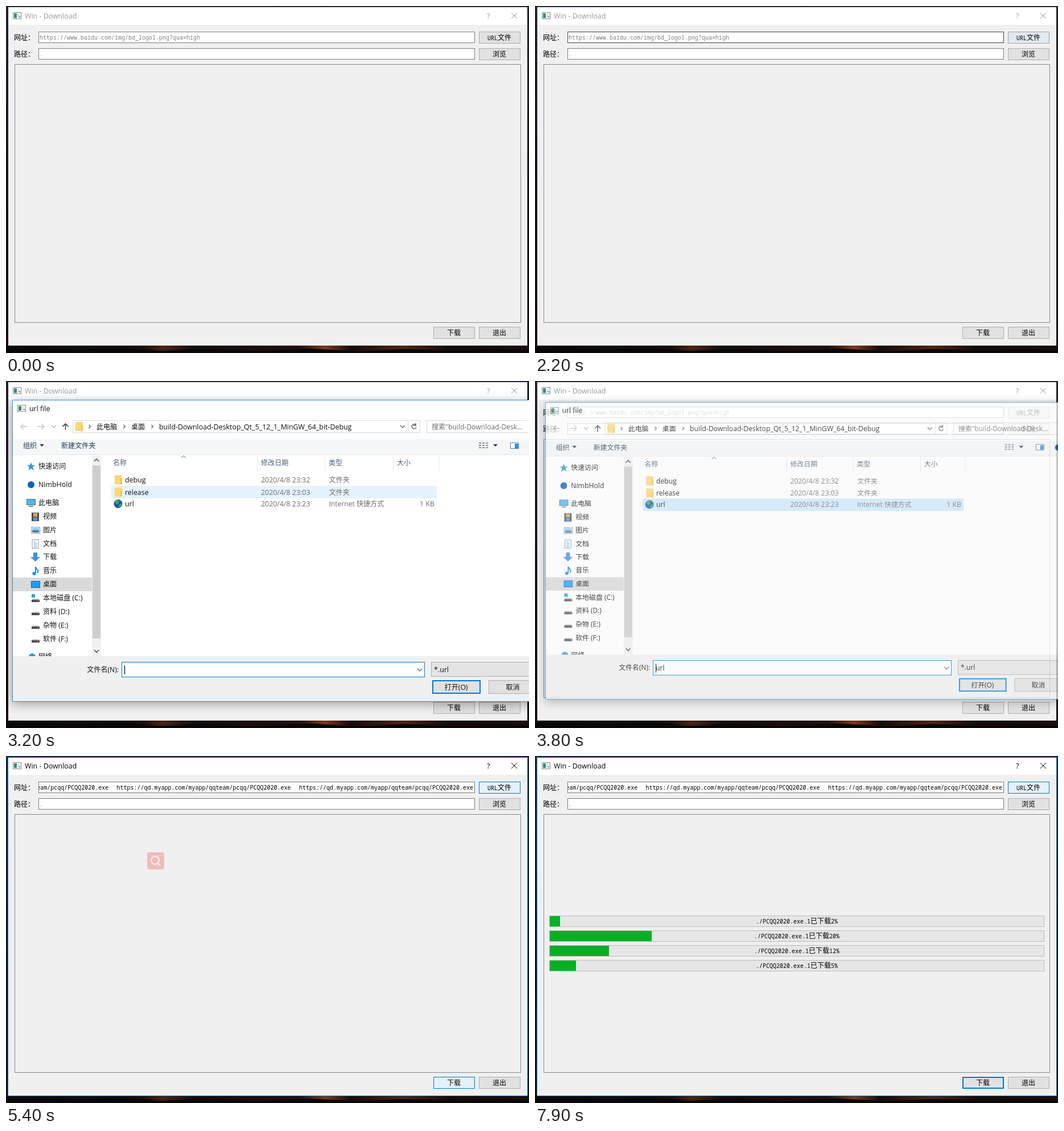
Animation, 919 px wide and 609 px high, one loop 8 s. Source, as an HTML page:

```html
<!DOCTYPE html>
<html lang="zh-CN">
<head>
<meta charset="utf-8">
<title>Win - Download</title>
<style>
html, body { margin: 0; width: 100%; height: 100%; overflow: hidden; background: #0c090d; }
svg { display: block; }
text { white-space: pre; }
.ui { font: 12.4px 'Open Sans', 'Noto Sans CJK SC', sans-serif; }
.cj { font-size: 12.1px; }
.song { font: 12px 'Noto Sans Mono', 'Noto Sans CJK SC', monospace; }
.mid { text-anchor: middle; }
.end { text-anchor: end; }
.base { filter: drop-shadow(0 4px 9px rgba(0, 0, 0, .35)); }
</style>
</head>
<body>
<svg id="stage" width="919" height="609" viewBox="0 0 919 609">
  <defs>
    <linearGradient id="dusk">
      <stop offset="0" stop-color="#0b080b"/><stop offset=".26" stop-color="#1a0d0b"/>
      <stop offset=".3" stop-color="#4a2416"/><stop offset=".36" stop-color="#140b0a"/>
      <stop offset=".56" stop-color="#20100c"/><stop offset=".61" stop-color="#7a3a1c"/>
      <stop offset=".66" stop-color="#150b0a"/><stop offset=".76" stop-color="#4d2513"/>
      <stop offset=".85" stop-color="#120a09"/><stop offset="1" stop-color="#1c0f0c"/>
    </linearGradient>
    <linearGradient id="sky" x2="0" y2="1">
      <stop offset="0" stop-color="#23222f"/><stop offset=".6" stop-color="#151219"/>
      <stop offset="1" stop-color="#1d100e"/>
    </linearGradient>
    <clipPath id="field"><path d="M58 46h765v18H58z"/></clipPath>
    <clipPath id="side"><path d="M12 131h139v352H12z"/></clipPath>
  </defs>
</svg>
<script>
const LOOP = 8000;
const BLUE = '#0078d7';
const stage = document.getElementById('stage');

// markup helpers
const rect = (x, y, w, h, fill, extra = '') =>
  `<rect x="${x}" y="${y}" width="${w}" height="${h}" fill="${fill}" ${extra}/>`;
const box = (x, y, w, h, fill, line, extra = '') =>
  rect(x + .5, y + .5, w - 1, h - 1, fill, `stroke="${line}" ${extra}`);
const line = (d, color, width = 1) =>
  `<path d="${d}" fill="none" stroke="${color}" stroke-width="${width}"/>`;
const shape = (d, fill) => `<path d="${d}" fill="${fill}"/>`;
const dot = (x, y, r, fill) => `<circle cx="${x}" cy="${y}" r="${r}" fill="${fill}"/>`;
const ui = (x, y, s, fill = '#111', cls = '') =>
  `<text class="ui ${/[^ -~]/.test(s) ? 'cj' : ''} ${cls}" x="${x}" y="${y}" fill="${fill}">${s}</text>`;
// half-width letters take 6px, full-width ones 12px
const half = s => s.replace(/[!-~]+/g, m => `<tspan font-size="10">${m}</tspan>`);
const song = (x, y, s, fill = '#000', cls = '', extra = '') =>
  `<text class="song ${cls}" x="${x}" y="${y}" fill="${fill}" ${extra}>${half(s)}</text>`;
const button = (id, x, y, label) =>
  box(x, y, 73, 21, '#e1e1e1', '#adadad', `id="${id}"`) + song(x + 36, y + 15, label, '#000', 'mid');
const down = (x, y, c = '#555', w = 1.2) => line(`M${x - 4} ${y - 2}l4 4 4-4`, c, w);
const next = x => line(`M${x - 1.5} 77l3 3-3 3`, '#555', 1.2);
const caret = (x, y) => shape(`M${x - 4} ${y - 2}h8l-4 4z`, '#1e395b');

const appIcon = (x, y) => box(x, y, 15, 12, '#fff', '#7d8790') + rect(x + 2, y + 2, 5, 8, '#2f8f6f') +
  rect(x + 9, y + 3, 1, 6, '#8fb0d0') + rect(x + 11, y + 7, 2, 2, '#4a78b0');
const folder = (x, y) => rect(x, y - 8, 13, 16, '#f8d775') + rect(x + 10, y - 3, 3, 11, '#efc55a');
const globe = (x, y) => dot(x, y, 7.5, '#1556a8') +
  shape(`M${x - 5} ${y - 5}q6-3 7 1-1 4-4 5-4-1-3-6zM${x + 2} ${y + 1}q5-2 4 2-2 3-5 3z`, '#3fae49');
const drive = (x, y) => shape(`M${x - 5} ${y}h10l2 2h-14z`, '#bfc3c6') + rect(x - 7, y + 2, 14, 4, '#4a4d50') +
  rect(x + 3, y + 3, 2, 1, '#6fe06f');
const page = (x, y) => box(x - 6, y - 8, 12, 16, '#fff', '#8b97a3') +
  line(`M${x - 3} ${y - 4}h4M${x - 3} ${y - 1}h6M${x - 3} ${y + 2}h6M${x - 3} ${y + 5}h6`, '#4a9fd8');

const places = [
  [150, '快速访问', 0, y => shape(`M44 ${y - 7}l2 5 5 0-4 3 2 6-5-3.500-5 3.500 2-6-4-3 5 0z`, '#2f93e0')],
  [182, 'NimbHold', 0, y => dot(44, y, 6, '#0a62c4')],
  [214, '此电脑', 0, y => box(36, y - 7, 16, 11, '#4fb4ee', '#4d7389') + rect(40, y + 5, 8, 2, '#7a8c98')],
  [238, '视频', 1, y => rect(45, y - 7, 13, 15, '#4b4f55') + rect(48, y - 6, 7, 6, '#d9a94c') + rect(48, y + 1, 7, 6, '#5d8fc9')],
  [262, '图片', 1, y => box(44, y - 6, 16, 12, '#fff', '#8b97a3') + rect(46, y - 4, 12, 4, '#8cc8f0') + rect(46, y, 12, 4, '#4d7f9b')],
  [286, '文档', 1, y => page(51.5, y)],
  [309, '下载', 1, y => shape(`M48 ${y - 8}h7v8h5l-8.500 8-8.500-8h5z`, '#3b93dc')],
  [333, '音乐', 1, y => line(`M52 ${y + 4}v-11q1 4 4 6 1 2-1 5`, '#1e8fe8', 2) + dot(49.500, y + 5, 3, '#1e8fe8')],
  [357, '桌面', 1, y => box(44, y - 6, 16, 12, '#18a0f5', '#0b62b8')],
  [381, '本地磁盘 (C:)', 1, y => drive(52, y + 1) + rect(45, y - 7, 6, 6, '#19a5e8')],
  [405, '资料 (D:)', 1, y => drive(52, y)],
  [429, '杂物 (E:)', 1, y => drive(52, y)],
  [453, '软件 (F:)', 1, y => drive(52, y)],
  [484, '网络', 0, y => dot(46, y, 6, '#3a9bd9') + rect(39, y - 1, 8, 6, '#7a8c98')]
];
const files = [
  [173.5, 'debug', '2020/4/8 23:32', '文件夹', '', folder],
  [195, 'release', '2020/4/8 23:03', '文件夹', '', folder],
  [215.5, 'url', '2020/4/8 23:23', 'Internet 快捷方式', '1 KB', (x, y) => globe(x + 6, y)]
];
const grey = '#6d6d6d', head = '#4c607a';

const desktop = rect(0, 0, 919, 609, 'url(#sky)') + rect(0, 596, 919, 13, 'url(#dusk)') +
  shape('M0 609v-7l60-3 60 3 80-3 70 6 80-3 90 4 90-5 90 5 80-4 90 3 80-3 49 3v4z', '#0a0708');

const exe = 'https://qd.myapp.com/myapp/qqteam/pcqq/PCQQ2020.exe';
const tops = [280, 306, 332, 358];

const main = rect(4, 2, 912, 594, '#f0f0f0') + rect(4, 2, 912, 31, '#fff') + appIcon(12, 11) +
  `<g id="title">${ui(33, 21.500, 'Win - Download', 'currentColor')}${ui(845, 21.500, '?', 'currentColor')}
   ${line('M888 12l10 10M898 12l-10 10', 'currentColor')}</g>` +
  song(14, 60, '网址：') + song(14, 89, '路径：') +
  box(57, 45, 767, 20, '#fff', '#7a7a7a', 'id="edit"') + box(57, 74, 767, 20, '#fff', '#7a7a7a') +
  song(59, 59, 'https://www.baidu.com/img/bd_logo1.png?qua=high', '#808080', '', 'id="hint"') +
  `<g id="links" clip-path="url(#field)">${song(821, 59, Array(4).fill(exe).join('  '), '#000', 'end')}</g>` +
  song(59, 88, '.', '#808080') +
  box(15, 102, 890, 454, 'none', '#828790') +
  button('pick', 831, 45, 'URL文件') + button('browse', 831, 74, '浏览') +
  button('load', 751, 563, '下载') + button('quit', 831, 563, '退出') +
  rect(752.5, 564.5, 70, 18, 'none', `id="focus" stroke="${BLUE}"`) +
  '<g id="bars">' + tops.map((y, i) => box(25, y, 870, 20, '#e6e6e6', '#bcbcbc') +
    rect(26, y + 1, 0, 18, '#06b025', `id="bar${i}"`) + song(460, y + 14, '', '#000', 'mid', `id="tag${i}"`)).join('') + '</g>' +
  rect(3.5, 2.5, 913, 594, 'none', `id="frame" stroke="${BLUE}"`);

const dialog = '<g id="dialog">' +
  rect(11.5, 33.5, 934, 529, '#fff', 'class="base" stroke="#3a8fd6"') +
  rect(12, 102, 933, 28, '#f5f6f7') + line('M12 129.500h933', '#e8e8e8') + rect(12, 483, 933, 79, '#f0f0f0') +
  appIcon(20, 42) + ui(41, 52.500, 'url file') +
  line('M66 80h-11m7-5l5 5-5 5', '#c4c4c4', 1.4) + down(84, 80, '#aaa') + line('M104.500 86v-11m-5 5l5-5 5 5', '#555', 1.8) +
  '<g id="late">' + line('M37 80h-11m5-5l-5 5 5 5', '#c4c4c4', 1.4) +
  box(117, 69, 611, 22, '#fff', '#d9d9d9') + folder(122, 80) + next(147) + ui(159, 84.500, '此电脑') + next(208) +
  ui(220, 84.500, '桌面') + next(257) + ui(269, 84.500, 'build-Download-Desktop_Qt_5_12_1_MinGW_64_bit-Debug') +
  down(697, 80) + line('M706.500 70v20', '#d9d9d9') + line('M720 77a4 4 0 1 0 1 4M720 74v4h-4', '#555', 1.3) +
  box(739, 69, 198, 22, '#fff', '#d9d9d9') + ui(748, 84.500, '搜索"build-Download-Desk...', grey) +
  ui(30, 118, '组织', '#1e395b') + caret(63, 113) + ui(97, 118, '新建文件夹', '#1e395b') +
  line('M831 109h4m2 0h4m2 0h4M831 113h4m2 0h4m2 0h4M831 117h4m2 0h4m2 0h4', '#8a8f96', 2) + caret(860, 113) + '</g>' +
  box(886, 108, 15, 11, '#fff', '#5c7fa3') + rect(894, 110, 6, 8, '#2b8fe0') + dot(925, 114, 5, '#0a68b8') +
  '<g id="sizeHover">' + rect(680, 130, 80, 28, '#d9ebf9') + line('M744.500 130v28', '#b5d5ee') + down(752, 144) + '</g>' +
  line('M441.500 130v28M560.500 130v28M680.500 130v28M760.500 130v28', '#e5e5e5') +
  line('M308 135l4-4 4 4', '#666') +
  [[188, '名称'], [448, '修改日期'], [567, '类型'], [687, '大小']].map(([x, s]) => ui(x, 148, s, head)).join('') +
  rect(185, 184, 572, 22, '#e5f3ff', 'id="row"') +
  files.map(([y, name, date, kind, size, icon]) => icon(191, y) + ui(209, y + 4.500, name) +
    ui(448, y + 4.500, date, grey) + ui(567.500, y + 4.500, kind, grey) + ui(753, y + 4.500, size, grey, 'end')).join('') +
  rect(12, 345, 139, 24, '#d9d9d9') + '<g clip-path="url(#side)">' +
  places.map(([y, s, sub, icon]) => icon(y) + ui(sub ? 65 : 57, y + 4, s)).join('') + '</g>' +
  rect(151, 131, 16, 352, '#f0f0f0') + rect(152, 148, 14, 304, '#cdcdcd') +
  line('M155 141l4-4 4 4', '#555', 1.6) + down(159, 474, '#555', 1.6) +
  ui(198, 510.500, '文件名(N):', '#111', 'end') + box(203, 493, 533, 27, '#fff', BLUE) +
  line('M208.500 499v16', '#000', 1.2) + `<g id="name">${ui(208, 511, 'url')}</g>` + down(727, 507) +
  box(747, 493, 190, 26, '#e4e4e4', '#adadad') + ui(752, 510.500, '*.url') +
  rect(750, 526, 83, 22, '#e1e1e1', `stroke="${BLUE}" stroke-width="2"`) + ui(791, 541.500, '打开(O)', '#111', 'mid') +
  box(848, 525, 85, 24, '#e1e1e1', '#adadad') + ui(890.500, 541.500, '取消', '#111', 'mid') + '</g>';

const lookup = '<g id="lookup">' + rect(248, 169, 30, 30, '#f04747', 'rx="4"') +
  '<circle cx="262" cy="183" r="7" fill="none" stroke="#fff" stroke-width="1.8"/>' +
  line('M266.500 188l4.500 4.500', '#fff', 2) + '</g>';

stage.insertAdjacentHTML('beforeend', desktop + main + dialog + lookup);

// timelines: [start, ...values], held until the next entry
const editLine = [[0, '#7a7a7a'], [900, '#484848'], [1000, '#171717'], [1700, '#333'], [1800, '#585858'],
  [1900, '#7a7a7a'], [2200, '#444'], [2300, '#666'], [2400, '#7a7a7a']];
const idle = ['#e1e1e1', '#adadad'], hover = ['#e5f1fb', BLUE], press = ['#cce4f7', '#005499'];
const pickLook = [[0, ...idle], [2200, '#e2e8ee', '#93a6b6'], [2300, ...hover], [2400, ...press],
  [2500, ...hover], [2800, ...idle], [3900, ...hover]];
const loadLook = [[0, ...idle], [5100, '#e2e5e7', '#82a0b8'], [5200, '#e3e9ee', '#5793c3'], [5300, '#e4edf4', '#2b86cd'],
  [5400, ...hover], [5600, '#d8ebf9', '#0066b8'], [5700, '#cce4f7', '#0063b1'], [6800, '#d3e3f0', BLUE],
  [6900, '#dae2e9', BLUE], [7000, '#e1e1e1', BLUE]];
const active = [[0, 0], [2400, 1], [2800, 0], [3900, 1]];
const dialogLook = [[0, 0, 1], [2800, .4, .97], [2900, .87, .9935], [3000, 1, 1],
  [3800, .75, .985], [3900, .4, .965], [4000, .1, .95], [4100, 0, 1]];
const rowLook = [[0, 0, 'none'], [3100, 174, '#e5f3ff'], [3200, 195, '#e5f3ff'], [3300, 216, '#e5f3ff'], [3500, 216, '#cce8ff']];
const lookupFade = [[0, 0], [3900, .6], [4000, 1], [4300, .96], [4600, .92], [4900, .86], [5100, .72],
  [5200, .58], [5300, .44], [5400, .3], [5600, .12], [5700, 0]];
const percent = [2.1, 20.6, 12, 5.3];

const at = (table, t) => table.filter(s => s[0] <= t).pop().slice(1);
const el = id => document.getElementById(id);
const set = (id, attrs) => Object.entries(attrs).forEach(([k, v]) => el(id).setAttribute(k, v));
const show = (id, on) => set(id, { visibility: on ? 'inherit' : 'hidden' });

function draw(t) {
  const [on] = at(active, t);
  el('title').style.color = on ? '#000' : '#999';
  show('frame', on);
  set('edit', { stroke: at(editLine, t)[0] });
  for (const [id, look] of [['pick', pickLook], ['load', loadLook]]) {
    const [fill, stroke] = at(look, t);
    set(id, { fill, stroke });
  }
  show('focus', t >= 6800);
  show('hint', t < 3900);
  show('links', t >= 3900);

  const [alpha, k] = at(dialogLook, t);
  show('dialog', alpha > 0);
  set('dialog', { opacity: alpha, transform: `translate(478 297.5) scale(${k}) translate(-478 -297.5)` });
  show('late', t >= 3000);
  show('sizeHover', t < 3100);
  show('name', t >= 3500);
  const [rowY, rowFill] = at(rowLook, t);
  set('row', { y: rowY - 11, fill: rowFill });
  set('lookup', { opacity: at(lookupFade, t)[0] });

  show('bars', t >= 6700);
  const part = Math.max(0, (t - 6900) / 1000);
  percent.forEach((p, i) => {
    const v = p * part;
    set('bar' + i, { width: Math.round(v * 8.68) });
    el('tag' + i).innerHTML = part ? half(`./PCQQ2020.exe.1已下载${Math.floor(v)}%`) : '';
  });
}

// the screen refreshes ten times a second
let last = -1;
const start = performance.now();
function tick() {
  const t = Math.floor((performance.now() - start) % LOOP / 100) * 100;
  if (t !== last) draw(last = t);
  requestAnimationFrame(tick);
}
draw(0);
tick();
</script>
</body>
</html>
```
